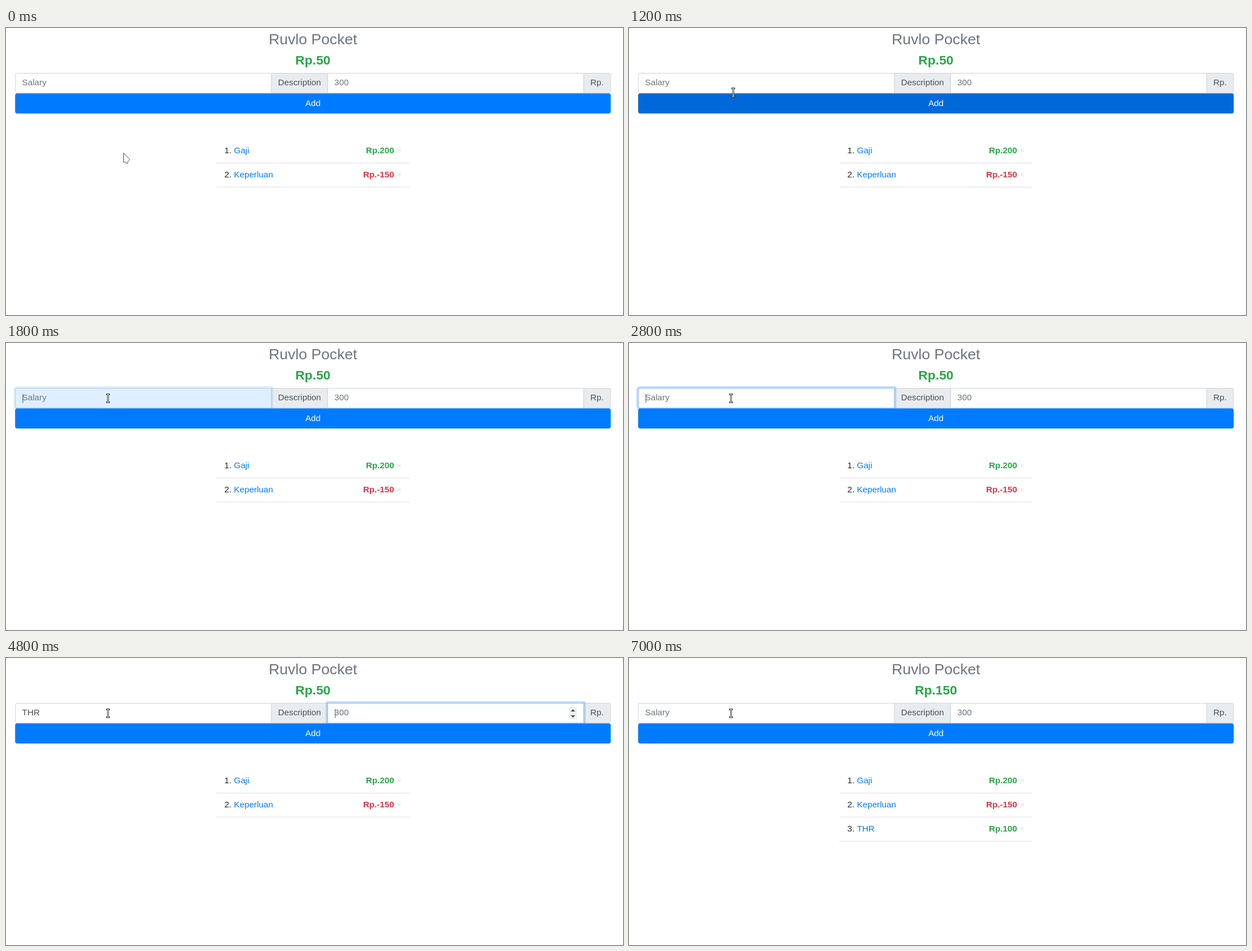
An HTML page with a canvas for the animation above (8 s loop, 1095x511 px).

```html
<!DOCTYPE html>
<html lang="id">
<head>
<meta charset="utf-8">
<style>
  html, body { margin: 0; width: 100%; height: 100%; overflow: hidden; background: #fff; }
  canvas { display: block; }
</style>
</head>
<body>
<canvas width="1095" height="511"></canvas>
<script>
const ctx = document.querySelector('canvas').getContext('2d');
const LOOP = 8000, SCALE = 0.9523;
const GREEN = '#28a745', RED = '#dc3545', BLUE = '#007bff', GREY = '#6c757d', INK = '#495057', LINE = '#ced4da';
const TOP = 84, HEIGHT = 38, BASE = 107.5;

// Value of the last [time, value] step that has been reached.
const at = (steps, t) => steps.filter(([start]) => start <= t).pop()[1];

const pointerSteps = [
  [0, ['arrow', 208, 222]], [900, ['arrow', 205, 209]], [1000, ['arrow', 198, 174]],
  [1100, ['hand', 190, 133]], [1200, ['beam', 185, 114.5]], [1300, ['beam', 183, 110.5]],
  [1400, ['beam', 181, 98.5]]
];
const buttonSteps = [[0, BLUE], [1100, '#0072ec'], [1200, '#0069d9'], [1300, BLUE]];
const noteFocus = [[0, 0], [1800, 0.45], [1900, 1], [4800, 0]];
const sumFocus = [[0, 0], [4800, 1], [7000, 0]];
const caretSteps = [[0, 0], [1800, 1], [2400, 0], [2800, 1], [3500, 0], [4200, 1], [5300, 0], [6100, 1], [7000, 0]];
const noteSteps = [[0, ''], [4200, 'THR'], [7000, '']];
const sumSteps = [[0, ''], [6100, '1'], [6300, '10'], [6600, '100'], [7000, '']];

function text(str, x, y, color, { size = 16, bold = false, align = 'left' } = {}) {
  ctx.font = `${bold ? 'bold ' : ''}${size}px "Liberation Sans", Arial, sans-serif`;
  ctx.textAlign = align;
  ctx.fillStyle = color;
  ctx.fillText(str, x, y);
}

function rect(x, y, w, h, color, radii = 0) {
  ctx.fillStyle = color;
  ctx.beginPath();
  ctx.roundRect(x, y, w, h, radii);
  ctx.fill();
}

function bordered(x, w, fill, border, radii) {
  rect(x, TOP, w, HEIGHT, border, radii);
  rect(x + 1, TOP + 1, w - 2, HEIGHT - 2, fill, radii.map(r => Math.max(0, r - 1)));
}

function polygon(points, fill, stroke) {
  ctx.beginPath();
  points.forEach(([x, y]) => ctx.lineTo(x, y));
  ctx.closePath();
  ctx.fillStyle = fill;
  ctx.fill();
  if (!stroke) return;
  ctx.strokeStyle = stroke;
  ctx.lineWidth = 1;
  ctx.stroke();
}

function field(x, radii, value, placeholder, focus, caret) {
  if (focus) {
    ctx.globalAlpha = focus;
    rect(x - 3.2, TOP - 3.2, 484.4, HEIGHT + 6.4, 'rgba(0,123,255,.25)', radii.map(r => r && r + 3.2));
    ctx.globalAlpha = 1;
  }
  bordered(x, 478, '#fff', LINE, radii);
  if (focus) {
    ctx.globalAlpha = focus;
    bordered(x, 478, '#fff', '#80bdff', radii);
    ctx.globalAlpha = 1;
  }
  text(value || placeholder, x + 13, BASE, value ? INK : GREY);
  if (focus && caret) {
    const end = value ? ctx.measureText(value).width : 0;
    rect(x + 14 + end, value ? 94.3 : 95.3, 1, 17, INK);
  }
}

function spinner() {
  rect(1049, 91, 15, 24, '#efefef');
  polygon([[1052.3, 100], [1060.7, 100], [1056.5, 95.8]], '#484848');
  polygon([[1052.3, 107], [1060.7, 107], [1056.5, 111.2]], '#484848');
}

function row(index, name, amount) {
  const y = 234 + 45 * index;
  text(`${index + 1}.`, 407, y, '#212529');
  text(name, 424.8, y, BLUE);
  text(`Rp.${amount}`, 723.2, y, amount < 0 ? RED : GREEN, { bold: true, align: 'right' });
  text('×', 737, y, '#dfe1e3', { align: 'right' });
  rect(392, 252 + 45 * index, 360, 1, '#dcdfe2');
}

const pointers = {
  arrow() {
    polygon([[0.5, 0.5], [0.5, 17], [4, 16.5], [5.5, 19], [8, 19.5], [8, 16], [11.5, 12]], '#fff', '#4a4f54');
  },
  hand() {
    polygon([[-1, 0], [1, 0], [1.5, 6], [8, 7.5], [8.5, 12], [6.5, 17], [-2, 17], [-6, 10], [-4.5, 9], [-1.5, 11]],
      '#fff', '#33383d');
  },
  beam() {
    for (const [color, width, cap] of [['#3d4247', 3, 'square'], ['#fff', 1, 'butt']]) {
      ctx.strokeStyle = color;
      ctx.lineWidth = width;
      ctx.lineCap = cap;
      ctx.beginPath();
      for (const y of [-7, 7]) {
        ctx.moveTo(-1.7, y);
        ctx.lineTo(1.7, y);
      }
      ctx.moveTo(0, -7);
      ctx.lineTo(0, 7);
      ctx.stroke();
    }
    ctx.lineCap = 'butt';
  }
};

function draw(t) {
  const added = t >= 7000, caret = at(caretSteps, t);
  const center = { align: 'center' };
  ctx.setTransform(1, 0, 0, 1, 0, 0);
  rect(0, 0, 1095, 511, '#fff');
  ctx.scale(SCALE, SCALE);

  text('Ruvlo Pocket', 572, 30.3, GREY, { size: 28, ...center });
  text(added ? 'Rp.150' : 'Rp.50', 572, 68.3, GREEN, { size: 24, bold: true, ...center });

  rect(17, 122, 1110, 38, at(buttonSteps, t), 4);
  text('Add', 572, 145.5, '#fff', center);

  bordered(494, 106, '#e9ecef', LINE, [0]);
  text('Description', 507, BASE, INK);
  bordered(1076, 51, '#e9ecef', LINE, [0, 4, 4, 0]);
  text('Rp.', 1089, BASE, INK);

  const sumActive = at(sumFocus, t);
  field(599, [0], at(sumSteps, t), '300', sumActive, caret);
  if (sumActive) spinner();
  field(17, [4, 0, 0, 4], at(noteSteps, t), 'Salary', at(noteFocus, t), caret);

  row(0, 'Gaji', 200);
  row(1, 'Keperluan', -150);
  if (added) row(2, 'THR', 100);

  const [shape, x, y] = at(pointerSteps, t);
  ctx.setTransform(1, 0, 0, 1, x, y);
  pointers[shape]();
}

function tick() {
  draw(performance.now() % LOOP);
  requestAnimationFrame(tick);
}
tick();
</script>
</body>
</html>
```
